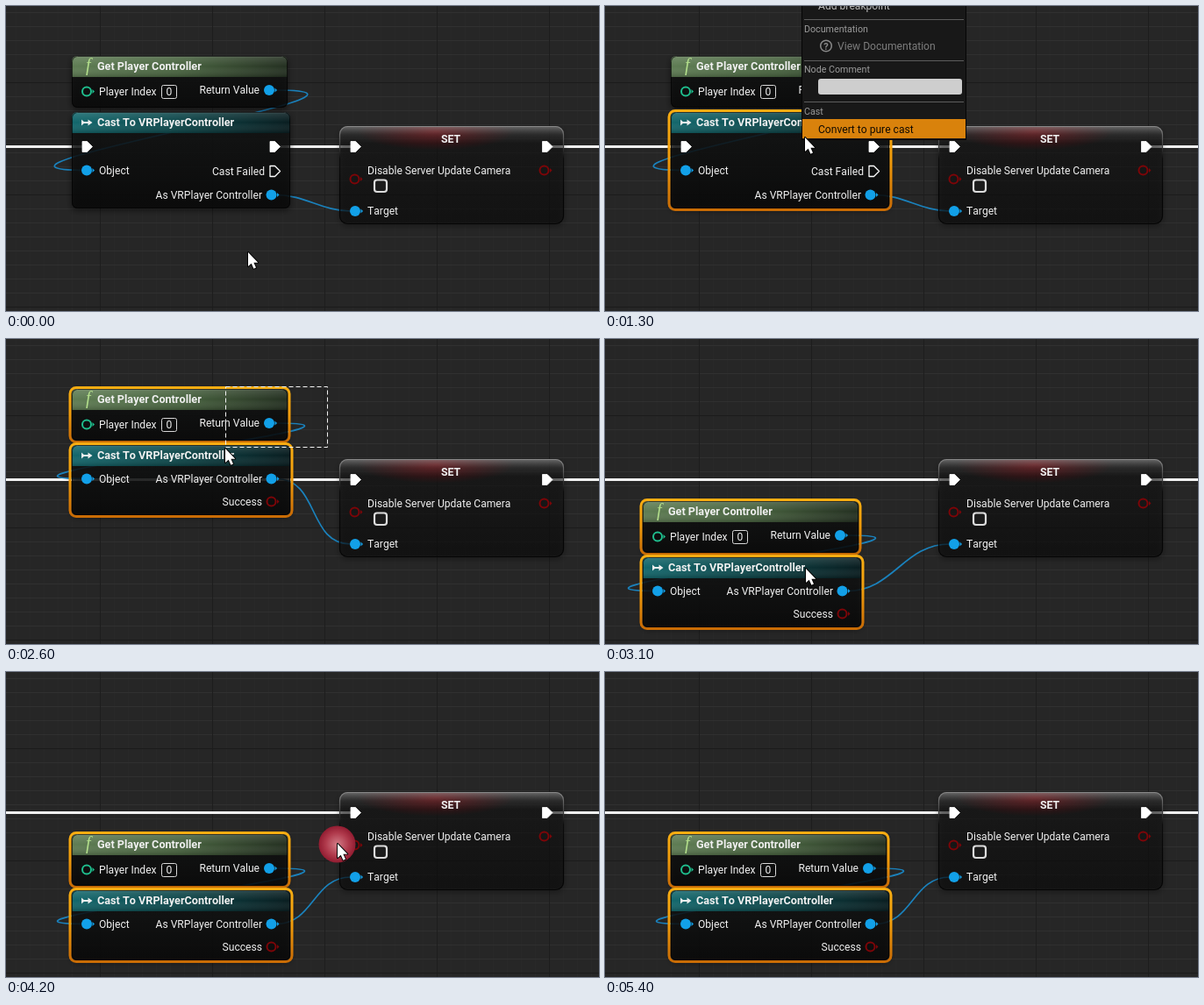
These frames come from a looping animation (676 px wide and 348 px high, 5600 ms). An HTML page with a canvas:

```html
<!DOCTYPE html>
<html lang="en">
<head>
<meta charset="utf-8">
<title>Convert to pure cast</title>
<style>
html, body { margin: 0; width: 100%; height: 100%; overflow: hidden; background: #262626; }
canvas { display: block; width: 676px; height: 348px; }
</style>
</head>
<body>
<canvas id="stage" width="676" height="348"></canvas>
<script>
const W = 676, H = 348, LOOP = 5600, STEP = 100;
const ctx = document.getElementById('stage').getContext('2d');
ctx.fontKerning = 'none';
ctx.lineJoin = 'round';
const BLUE = '#12a0e8', RED = '#7d0508', INK = '#f0f0f0';

// Moments of the interaction, in ms
const SELECT = 1100, MENU = 1200, PURE = 2000, MARQUEE = 2300, GRAB = 2700, DROP = 3800, CLICK = 4200;

// Pointer path: time, x, y
const PATH = [
  [0, 276, 281], [200, 276, 281], [700, 236, 163], [900, 236, 163], [1100, 225, 152],
  [1300, 228, 150], [1700, 258, 141], [1900, 258, 141], [2300, 367, 54], [2600, 250, 125],
  [2700, 261, 142], [3000, 229, 270], [3200, 229, 254], [3600, 229, 254], [3800, 261, 270],
  [4200, 378, 196], [4400, 378, 196], [4800, 430, 240], [5300, 590, 350], [5600, 590, 350]
];

function pointerAt(t) {
  const i = Math.max(1, PATH.findIndex(p => p[0] >= t));
  const [a, x0, y0] = PATH[i - 1], [b, x1, y1] = PATH[i];
  const u = (t - a) / (b - a), k = u * u * (3 - 2 * u);
  return { x: x0 + (x1 - x0) * k, y: y0 + (y1 - y0) * k };
}

function dragAt(t) {
  if (t < GRAB) return { x: 0, y: 0 };
  const p = pointerAt(Math.min(t, DROP));
  const snap = v => Math.round(v / 16) * 16;
  return { x: snap(p.x - 261), y: snap(p.y - 142) };
}

function label(s, x, y, { size = 12.1, bold = false, color = INK, align = 'left' } = {}) {
  ctx.font = `${bold ? 'bold ' : ''}${size}px Roboto, sans-serif`;
  ctx.textAlign = align;
  ctx.fillStyle = color;
  ctx.fillText(s, x, y);
}

function box(x, y, w, h, r = 0) {
  ctx.beginPath();
  ctx.roundRect(x, y, w, h, r);
}

function poly(points) {
  ctx.beginPath();
  points.forEach(([x, y]) => ctx.lineTo(x, y));
  ctx.closePath();
}

function stroke(color, width) {
  ctx.strokeStyle = color;
  ctx.lineWidth = width;
  ctx.stroke();
}

function fill(color) {
  ctx.fillStyle = color;
  ctx.fill();
}

function ramp(x0, y0, x1, y1, ...colors) {
  const g = ctx.createLinearGradient(x0, y0, x1, y1);
  colors.forEach((c, i) => g.addColorStop(i / (colors.length - 1), c));
  return g;
}

function line(x0, y0, x1, y1, color, width) {
  ctx.beginPath();
  ctx.moveTo(x0, y0);
  ctx.lineTo(x1, y1);
  stroke(color, width);
}

function drawGrid() {
  ctx.fillStyle = '#262626';
  ctx.fillRect(0, 0, W, H);
  const rule = (from, gap, across, color) => {
    ctx.fillStyle = color;
    for (let v = from; v < (across ? H : W); v += gap)
      across ? ctx.fillRect(0, v, W, 1) : ctx.fillRect(v, 0, 1, H);
  };
  rule(11, 16, false, '#282828');
  rule(7, 16, true, '#303030');
  rule(107, 128, false, '#1d1d1d');
  rule(87, 128, true, '#1b1b1b');
}

function wire(x0, y0, x1, y1, d) {
  ctx.beginPath();
  ctx.moveTo(x0, y0);
  ctx.bezierCurveTo(x0 + d, y0, x1 - d, y1, x1, y1);
  stroke('#1a82bd', 1.7);
}

function execWire(x0, x1) {
  line(x0, 160.5, x1, 160.5, '#f4f4f4', 3);
}

function pin(x, y, color, solid) {
  ctx.beginPath();
  ctx.arc(x, y, solid ? 6 : 5, 0, 7);
  solid ? fill(color) : stroke(color, 2);
  poly([[x + 6.5, y - 2.5], [x + 9, y], [x + 6.5, y + 2.5]]);
  fill(color);
}

function execPin(x, y, hollow) {
  poly([[x, y - 6], [x + 5.5, y - 6], [x + 11.5, y], [x + 5.5, y + 6], [x, y + 6]]);
  if (!hollow) fill('#fff');
  stroke('#fff', hollow ? 1.3 : .8);
}

function panel(x, y, w, h, r, top, bottom) {
  ctx.save();
  ctx.shadowColor = 'rgba(0,0,0,.7)';
  ctx.shadowBlur = 7;
  ctx.shadowOffsetY = 2;
  box(x, y, w, h, r);
  fill(ramp(0, y, 0, y + h, top, bottom));
  ctx.restore();
}

function node(x, y, w, h, title, tint, selected) {
  panel(x, y, w, h, 6, 'rgba(20,22,22,.72)', 'rgba(9,9,9,.78)');
  box(x, y, w, 24, [6, 6, 0, 0]);
  fill(ramp(x, 0, x + w, 0, ...tint));
  fill(ramp(0, y, 0, y + 24, 'rgba(255,255,255,.14)', 'rgba(255,255,255,0)', 'rgba(0,0,0,.2)'));
  line(x + 5, y + .7, x + w - 5, y + .7, 'rgba(255,255,255,.25)', 1);
  box(x + .5, y + .5, w - 1, h - 1, 6);
  stroke('rgba(0,0,0,.65)', 1);
  label(title, x + 29, y + 16.3, { size: 12.65, bold: true });
  if (selected) {
    box(x - 2, y - 1.5, w + 4, h + 3, 7);
    stroke(ramp(0, y, 0, y + h, '#f8ad12', '#ef9a0a', '#c96c05'), 3);
  }
}

function drawGet(selected) {
  node(75, 57, 246, 59, 'Get Player Controller', ['#5f7d54', '#48633f', '#243021'], selected);
  ctx.font = 'italic 20px "Liberation Serif", serif';
  ctx.textAlign = 'left';
  ctx.fillStyle = '#b4e08c';
  ctx.fillText('f', 91, 74);
  pin(92, 97.5, '#1fbd8d', false);
  label('Player Index', 106, 102);
  box(177.5, 90.5, 17, 15, 2);
  stroke('#d8d8d8', 1);
  label('0', 186, 102, { align: 'center' });
  label('Return Value', 289, 100, { align: 'right' });
  pin(300, 96, BLUE, true);
}

function drawCast(pure, selected) {
  node(75, 121, 249, pure ? 80 : 110, 'Cast To VRPlayerController', ['#13686d', '#0d4548', '#091d20'], selected);
  line(86, 133, 94, 133, '#eee', 2);
  poly([[86, 129.5], [90, 133], [86, 136.5]]);
  fill('#eee');
  poly([[93.5, 129.5], [98.5, 133], [93.5, 136.5]]);
  fill('#eee');
  const obj = pure ? 159.5 : 187.5, out = pure ? 159.5 : 215.5;
  pin(92, obj, BLUE, true);
  label('Object', 106, obj + 4.5);
  label('As VRPlayer Controller', 292, out + 4.5, { align: 'right' });
  pin(302.5, out, BLUE, true);
  if (pure) {
    label('Success', 292, 190, { align: 'right' });
    pin(302.5, 185.5, RED, false);
  } else {
    execPin(87, 160.5);
    execPin(301, 160.5);
    label('Cast Failed', 295, 193, { align: 'right' });
    execPin(301, 188.5, true);
  }
}

function drawSet() {
  const x = 380, y = 137, w = 256, h = 112;
  panel(x, y, w, h, 9, 'rgba(24,24,24,.46)', 'rgba(12,12,12,.52)');
  ctx.save();
  box(x, y, w, h, 9);
  ctx.clip();
  const glow = ctx.createRadialGradient(0, 0, 0, 0, 0, 90);
  glow.addColorStop(0, 'rgba(120,14,20,.75)');
  glow.addColorStop(1, 'rgba(100,10,16,0)');
  ctx.save();
  ctx.translate(490, 143);
  ctx.scale(1, .24);
  ctx.fillStyle = glow;
  ctx.fillRect(-110, -100, 220, 200);
  ctx.restore();
  ctx.fillStyle = ramp(0, y, 0, y + 20, 'rgba(200,200,200,.45)', 'rgba(150,150,150,.14)', 'rgba(120,120,120,0)');
  ctx.fillRect(x, y, w, 20);
  ctx.restore();
  box(x + .5, y + .5, w - 1, h - 1, 9);
  stroke(ramp(0, y, 0, y + h, '#8a8a8a', '#0c0c0c', '#050505', '#050505'), 1.2);
  label('SET', 507, 156, { size: 12.3, bold: true, align: 'center' });
  execPin(393, 160.5);
  execPin(611.5, 160.5);
  pin(397.5, 197.5, RED, false);
  pin(613.5, 187.5, RED, false);
  label('Disable Server Update Camera', 412, 192);
  box(420, 198.5, 14, 13.5, 3);
  fill('#1c1c1c');
  stroke('#dcdcdc', 2.2);
  pin(398, 234, BLUE, true);
  label('Target', 412, 238.3);
}

function tip(x, y, w, h, text, size, alpha = 1) {
  ctx.save();
  ctx.globalAlpha = alpha;
  ctx.fillStyle = '#111';
  ctx.fillRect(x, y, w, h);
  ctx.fillStyle = '#f0f0f0';
  ctx.fillRect(x + 1, y + 1, w - 2, h - 2);
  label(text, x + 9.5, y + h / 2 + 4, { size, color: '#0c0c0c' });
  ctx.restore();
}

function drawMenu(hover) {
  const heading = (s, y) => label(s, 227, y, { size: 10.7, color: '#9b9b9b' });
  ctx.fillStyle = '#050505';
  ctx.fillRect(224, -4, 188, 157);
  ctx.fillStyle = '#181818';
  ctx.fillRect(225, -4, 186, 156);
  label('Add breakpoint', 243, 4, { color: '#b8b8b8' });
  for (const y of [15.5, 62.5, 109.5]) line(227, y, 409, y, '#5c5c5c', 1);
  heading('Documentation', 30);
  ctx.beginPath();
  ctx.arc(252, 45.5, 6.3, 0, 7);
  stroke('#8a8a8a', 1.5);
  label('?', 252, 49.5, { size: 11, bold: true, color: '#8a8a8a', align: 'center' });
  label('View Documentation', 265, 50, { color: '#7d7d7d' });
  heading('Node Comment', 76);
  box(243, 83, 164, 18, 3);
  fill('#cecece');
  heading('Cast', 124);
  if (hover) {
    ctx.fillStyle = '#d9820c';
    ctx.fillRect(225, 129, 186, 22);
  }
  label('Convert to pure cast', 243, 145, { color: hover ? '#140c02' : '#c4c4c4' });
}

function drawArrow(x, y) {
  poly([[0, 0], [0, 16], [3.7, 12.7], [6.4, 18.8], [9, 17.6], [6.4, 11.7], [11.3, 11.7]].map(p => [x + p[0], y + p[1]]));
  stroke('#000', 1.8);
  fill('#fff');
}

function drawMove(x, y) {
  ctx.save();
  ctx.translate(x, y);
  for (const [color, grow] of [['#000', 2], ['#fff', 0]]) {
    for (let i = 0; i < 4; i++) {
      ctx.rotate(Math.PI / 2);
      line(0, 0, 7, 0, color, 1.8 + grow);
      poly([[6, -3.5], [10, 0], [6, 3.5]]);
      if (grow) stroke(color, grow);
      fill(color);
    }
  }
  ctx.restore();
}

function drawClick(x, y, alpha) {
  ctx.save();
  ctx.globalAlpha = alpha;
  const g = ctx.createRadialGradient(x, y, 1, x, y, 21);
  g.addColorStop(0, '#cf7682');
  g.addColorStop(.6, '#b03a4c');
  g.addColorStop(1, '#921c31');
  ctx.beginPath();
  ctx.arc(x, y, 21, 0, 7);
  fill(g);
  ctx.restore();
}

function draw(t) {
  const p = pointerAt(t), d = dragAt(t), pure = t >= PURE;
  const within = (a, b) => t >= a && t < b;
  const marquee = t > MARQUEE && t < GRAB;
  const getSelected = t > MARQUEE;
  const castSelected = within(SELECT, MARQUEE) || (t > MARQUEE && (t >= GRAB || p.y > 121));
  const objY = pure ? 159.5 : 187.5, outY = (pure ? 159.5 : 215.5) + d.y;

  drawGrid();
  if (pure) execWire(0, 393);
  else {
    execWire(0, 88);
    execWire(311, 393);
  }
  execWire(622, W);
  wire(308 + d.x, 96 + d.y, 91 + d.x, objY + d.y, pure ? 169 : 182);
  const x0 = 308 + d.x;
  wire(x0, outY, 393, 234, (393 - x0 + Math.abs(234 - outY)) * .31);

  drawSet();
  ctx.save();
  ctx.translate(d.x, d.y);
  drawGet(getSelected);
  drawCast(pure, castSelected);
  ctx.restore();

  if (within(800, SELECT)) tip(251, 166, 139, 32, 'K2Node Dynamic Cast', 12, t < 900 ? .5 : 1);
  if (within(3300, 3600)) tip(238, 262, 141, 32, 'K2Node Dynamic Cast', 12, t < 3400 ? .5 : 1);
  if (within(MENU, PURE)) {
    drawMenu(p.x > 225 && p.y > 129 && p.y < 152);
    if (t >= 1700)
      tip(271.5, 157, 440, 32, 'Removes the execution pins to make the node more versatile (NOTE: the cast could fail)', 10.7);
  }
  if (marquee) {
    ctx.setLineDash([5, 3]);
    box(Math.round(p.x) + .5, 54.5, 366 - Math.round(p.x), Math.round(p.y) - 56);
    stroke('#f2f2f2', 1);
    ctx.setLineDash([]);
  }
  if (within(CLICK, CLICK + 300)) drawClick(p.x - .5, p.y + .5, 1 - (t - CLICK) / 300);
  if (within(700, SELECT)) drawMove(p.x, p.y);
  else if (t < 5400) drawArrow(p.x, p.y);
}

function frame() {
  const t = performance.now() % LOOP;
  draw(Math.floor(t / STEP) * STEP);
  requestAnimationFrame(frame);
}
frame();
</script>
</body>
</html>
```
